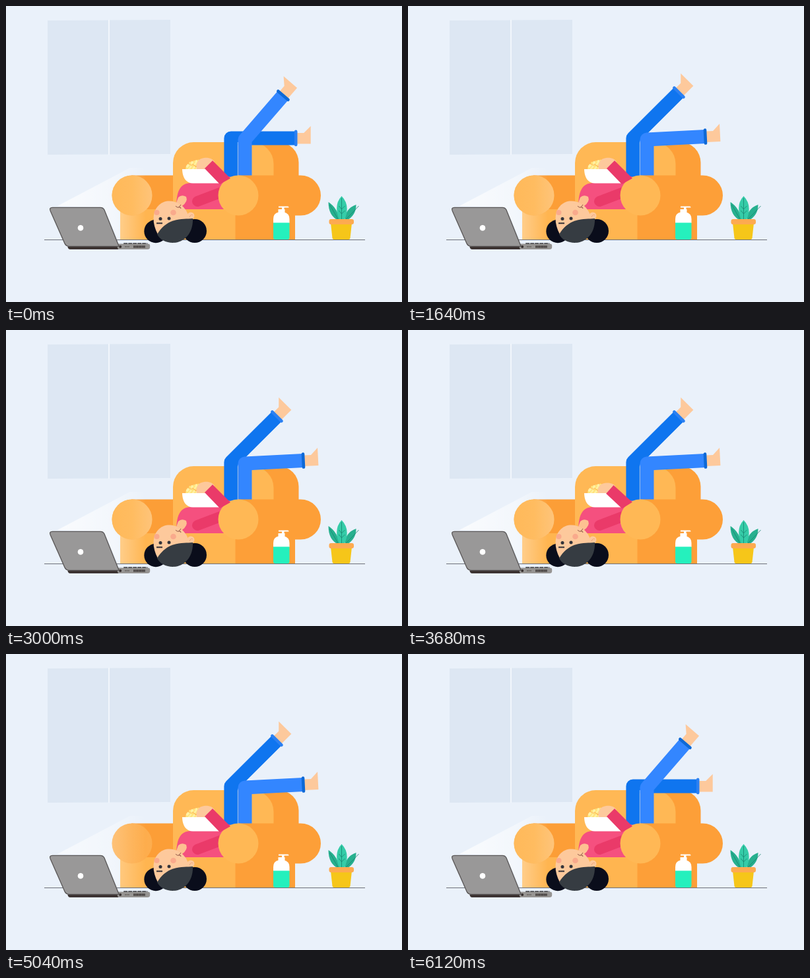
Animation of 600x450 px, one loop 6160 ms. Source, as an HTML page:

```html
<!DOCTYPE html>
<html lang="en">
<head>
<meta charset="utf-8">
<title>Lazy evening</title>
<style>
html, body { margin: 0; width: 100%; height: 100%; overflow: hidden; background: #eaf1fa; }
svg { display: block; width: 600px; height: 450px; }
</style>
</head>
<body>
<svg viewBox="0 0 600 450" xmlns="http://www.w3.org/2000/svg">
  <defs>
    <linearGradient id="beamFill" gradientUnits="userSpaceOnUse" x1="80" y1="302" x2="212" y2="302">
      <stop offset="0" stop-color="#fff" stop-opacity=".75"/>
      <stop offset=".6" stop-color="#fff" stop-opacity=".45"/>
      <stop offset="1" stop-color="#fff" stop-opacity="0"/>
    </linearGradient>
    <linearGradient id="armFill">
      <stop offset="0" stop-color="#ffb95a"/>
      <stop offset=".5" stop-color="#ffbc60"/>
      <stop offset="1" stop-color="#fec47a"/>
    </linearGradient>
  </defs>

  <rect width="600" height="450" fill="#eaf1fa"/>
  <path d="M63 22L249 21V225L63 226Z" fill="#dde7f3"/>
  <path d="M156 21V226" stroke="#f1f6fc" stroke-width="2"/>
  <path d="M58 355.5H544" stroke="#6d7078" stroke-width="1"/>

  <g id="sofa">
    <path d="M370 207H412.500A31 31 0 0 1 443.500 238V300H370Z" fill="#fd9f38"/>
    <path d="M253 320V238.500A31.500 31.500 0 0 1 284.500 207H372.500A33 33 0 0 1 405.500 240V320Z" fill="#ffb855"/>
    <path d="M173 300H348V355H173Z" fill="#ffb550"/>
    <path d="M190 257.500H253V309H190Z" fill="#fc9e37"/>
    <circle cx="191" cy="288" r="30.500" fill="#fda640"/>
  </g>

  <path id="beam" d="M78 304L188 246H232V355H170L148 306Z" fill="url(#beamFill)"/>
  <circle id="armGlow" cx="191" cy="288" r="30.500" fill="url(#armFill)"/>

  <g id="backLeg"></g>
  <g id="frontLeg"></g>

  <path d="M258 309C258 284 262 269 281 269H322L331 258L352 262V309Z" fill="#f5507f"/>
  <path d="M290 297L332 281" stroke="#ea3a69" stroke-width="16" stroke-linecap="round"/>
  <path d="M347.500 300H438V355H347.500Z" fill="#fd9f38"/>
  <path d="M352 257.500H446.500A30.500 30.500 0 0 1 446.500 318.500H352Z" fill="#fd9f38"/>
  <circle cx="352" cy="288" r="30.500" fill="#ffb855"/>

  <g id="popcorn"></g>
  <g id="hand">
    <path d="M289 248C287 239 291 232 300 231C308 230 314 233 316 237L303 249Z" fill="#fdc99c"/>
  </g>
  <path d="M267 248H305L324 268V269.500H283C272 269.500 267 259 267 248Z" fill="#fff"/>
  <path id="sleeve" d="M301 247L313 235L340 262L324 271Z" fill="#ea3a69"/>

  <g id="head">
    <circle cx="227" cy="342.500" r="17.700" fill="#0a0d1b"/>
    <circle cx="286" cy="342" r="18" fill="#0a0d1b"/>
    <path d="M257 302L261 291Q266 286 273 290Q276 297 267 304Z" fill="#fdc191"/>
    <circle cx="280" cy="319" r="5.500" fill="#fdc99c"/>
    <path d="M278 321Q280 316 283 318" fill="none" stroke="#e99b78" stroke-width=".8"/>
    <path d="M230 347C219 327 222 305 239 298C255 292 277 305 277 326L255 345Z" fill="#fdc99c"/>
    <circle cx="228.500" cy="314" r="4" fill="#f9aa8c"/>
    <circle cx="253.500" cy="314" r="4.300" fill="#f9aa8c"/>
    <path d="M229 347C235 337 243 330 253 326.500C264 323 275 324 283 323C284 345 270 360 253 360C242 360 233 355 229 347Z" fill="#363c42"/>
    <path d="M228 330.300H237" stroke="#343238" stroke-width="2"/>
    <ellipse class="eye" cx="234" cy="323.500" rx="2.500" ry="2.500" fill="#34343a"/>
    <ellipse class="eye" cx="247" cy="323" rx="2.500" ry="2.500" fill="#34343a"/>
    <path id="lips" d="M257 304Q259 307 262 306Q265 305 265 308M262 306L265 302" fill="none" stroke="#8f5546" stroke-width="1"/>
    <ellipse id="mouth" cx="261" cy="306" rx="4.500" ry="5" fill="#8f3f42"/>
  </g>
  <g id="tossed"></g>

  <g id="laptop" transform="translate(.2 .4)">
    <path d="M93 365H173V369.500H97Q94 369.500 93 365Z" fill="#3c3432"/>
    <path d="M170 361H215Q218 361 218 364V366Q218 369.500 214 369.500H170Q167 365 170 361Z" fill="#969492"/>
    <path d="M178 360.500H214" stroke="#37373a" stroke-width="1.500" stroke-dasharray="6 1"/>
    <path d="M193 365.500H211" stroke="#443e3d" stroke-width="3.500" stroke-dasharray="2 .5"/>
    <path d="M180 365.500H187" stroke="#55504e" stroke-width="1.500" stroke-dasharray="1.500 1"/>
    <circle cx="173" cy="365.500" r="2" fill="#37302f"/>
    <path d="M70 306H143Q147 306 149 310L171 365H96Q91 365 89 361L67 311Q65 306 70 306Z" fill="#999898" stroke="#595656" stroke-width="1.300"/>
    <circle cx="112.800" cy="337" r="4.300" fill="#fff"/>
  </g>

  <g id="bottle">
    <path d="M413 304.500H427Q428.500 304.500 428.500 306.500H421.500V309H422.500V315H412.500V309H418V306.500H413Z" fill="#fff"/>
    <path d="M405 330V324Q405 315 413 313.500H421Q429.500 315 429.500 324V330Z" fill="#fff"/>
    <path d="M405 329.500H429.500V352Q429.500 355 426.500 355H408Q405 355 405 352Z" fill="#25f0bd"/>
  </g>

  <g id="plant">
    <g transform="translate(.5 1)">
      <path d="M503 325Q488 318 488 297Q502 306 505 325Z" fill="#27b08f"/>
      <path d="M513 325Q513 307 530 301Q530 317 516 325Z" fill="#27b08f"/>
      <path d="M505 325Q495 302 508 288Q522 302 512 325Z" fill="#35cca8"/>
      <path d="M508 291V324M490 301L503 324M534 303L514 324M508 308L504 303M508 308L513 303M508 315L504 310M508 315L513 310" fill="none" stroke="#18836f" stroke-width=".8"/>
    </g>
    <path d="M492 330H524L521.500 353Q521 355 519 355H497Q495 355 494.500 353Z" fill="#f6c619"/>
    <rect x="489.500" y="324" width="37.500" height="8" rx="3" fill="#fdaa50"/>
  </g>
</svg>

<script>
const LOOP = 6160, FRAME = 40, SWING = 680, KICK = 320, TOSS_EVERY = 3060;
const $ = id => document.getElementById(id);
const clamp = v => Math.max(0, Math.min(1, v));
const ease = v => (v = clamp(v), v * v * (3 - 2 * v));
const bump = (t, center, half) => ease(1 - Math.abs(t - center) / half);
const rad = deg => deg * Math.PI / 180;

// A leg is a bent thick line plus a cuff and foot turning about the knee.
function makeLeg(group, { x, y, reach, color, cuff, edge }) {
  group.innerHTML = `
    <path class="shin" fill="none" stroke="${color}" stroke-width="21" stroke-linejoin="round"/>
    ${edge ? `<path d="M${x - 10.7} ${y + 4}V258" stroke="#a8c9f6" stroke-width=".8"/>` : ''}
    <g class="end">
      <path d="M1 -8H12L22.500 -18.500V8.500H1Z" fill="#fdc99c"/>
      <path d="M0 -10V10" stroke="${cuff}" stroke-width="4.600" stroke-linecap="round"/>
    </g>`;
  const shin = group.querySelector('.shin'), end = group.querySelector('.end');
  return deg => {
    const ex = x + reach * Math.cos(rad(deg)), ey = y - reach * Math.sin(rad(deg));
    shin.setAttribute('d', `M${x} 262V${y}L${ex} ${ey}`);
    end.setAttribute('transform', `translate(${ex} ${ey}) rotate(${-deg})`);
  };
}

const poseBack = makeLeg($('backLeg'), { x: 340.9, y: 200.9, reach: 98.3, color: '#0f75ef', cuff: '#2b80f2' });
const poseFront = makeLeg($('frontLeg'), { x: 362, y: 203, reach: 88.6, color: '#3386ff', cuff: '#0e69d6', edge: true });

const kernel = (x, y, r, i) => `<circle cx="${x}" cy="${y}" r="${r}" fill="${i % 2 ? '#fff2a8' : '#ffe47c'}"/>`;

// Kernels spread over the bowl, heaped towards the hand.
$('popcorn').innerHTML = Array.from({ length: 36 }, (_, i) => {
  const across = (i * 11) % 36 / 35, up = (i * 5) % 7 / 6;
  return kernel(274 + 22 * across, 246.5 - up * (4 + 8 * Math.sqrt(across)), 1.9, i);
}).join('');
$('tossed').innerHTML = [[-3, 0], [2, -2], [2, 3]].map(([x, y], i) => kernel(x, y, 2.6, i)).join('');

const eyes = document.querySelectorAll('.eye');

function draw(t) {
  const phase = t % SWING;
  const kick = phase < KICK ? ease(phase / KICK) : 1 - ease((phase - KICK) / (SWING - KICK));
  poseBack(47 * kick);
  poseFront(49.2 - 48.4 * kick);

  const toss = t % TOSS_EVERY;
  const dip = bump(toss, 610, 140), flick = bump(toss, 890, 120);
  const turn = `rotate(${flick * 10 - dip * 3} 334 265)`;
  $('hand').setAttribute('transform', turn);
  $('sleeve').setAttribute('transform', turn);

  // Popcorn flies up from the hand and drops into the mouth.
  const flight = (toss - 880) / 620;
  const flying = flight >= 0 && flight <= 1;
  const rise = 4 * flight * (1 - flight);
  $('tossed').setAttribute('visibility', flying ? 'visible' : 'hidden');
  $('tossed').setAttribute('transform',
    `translate(${299 - 38 * flight} ${232 + 72 * flight - 208 * rise})`);

  const gape = bump(toss, 1390, 190);
  $('mouth').setAttribute('ry', 5 * gape);
  $('mouth').setAttribute('opacity', gape > .03 ? 1 : 0);
  $('lips').setAttribute('opacity', gape > .03 ? 0 : 1);

  const blink = Math.max(...[400, 3440, 5960].map(at => bump(t, at, 110)));
  eyes.forEach(eye => eye.setAttribute('ry', 2.5 - 2 * blink));

  const dim = Math.max(bump(t, 2300, 650), bump(t, 5040, 650));
  $('armGlow').setAttribute('opacity', 1 - .75 * dim);
  $('beam').setAttribute('opacity', 1 - .2 * dim);
}

const start = performance.now();
function tick() {
  const t = (performance.now() - start) % LOOP;
  draw(Math.floor(t / FRAME) * FRAME);
  requestAnimationFrame(tick);
}
draw(0);
requestAnimationFrame(tick);
</script>
</body>
</html>
```
